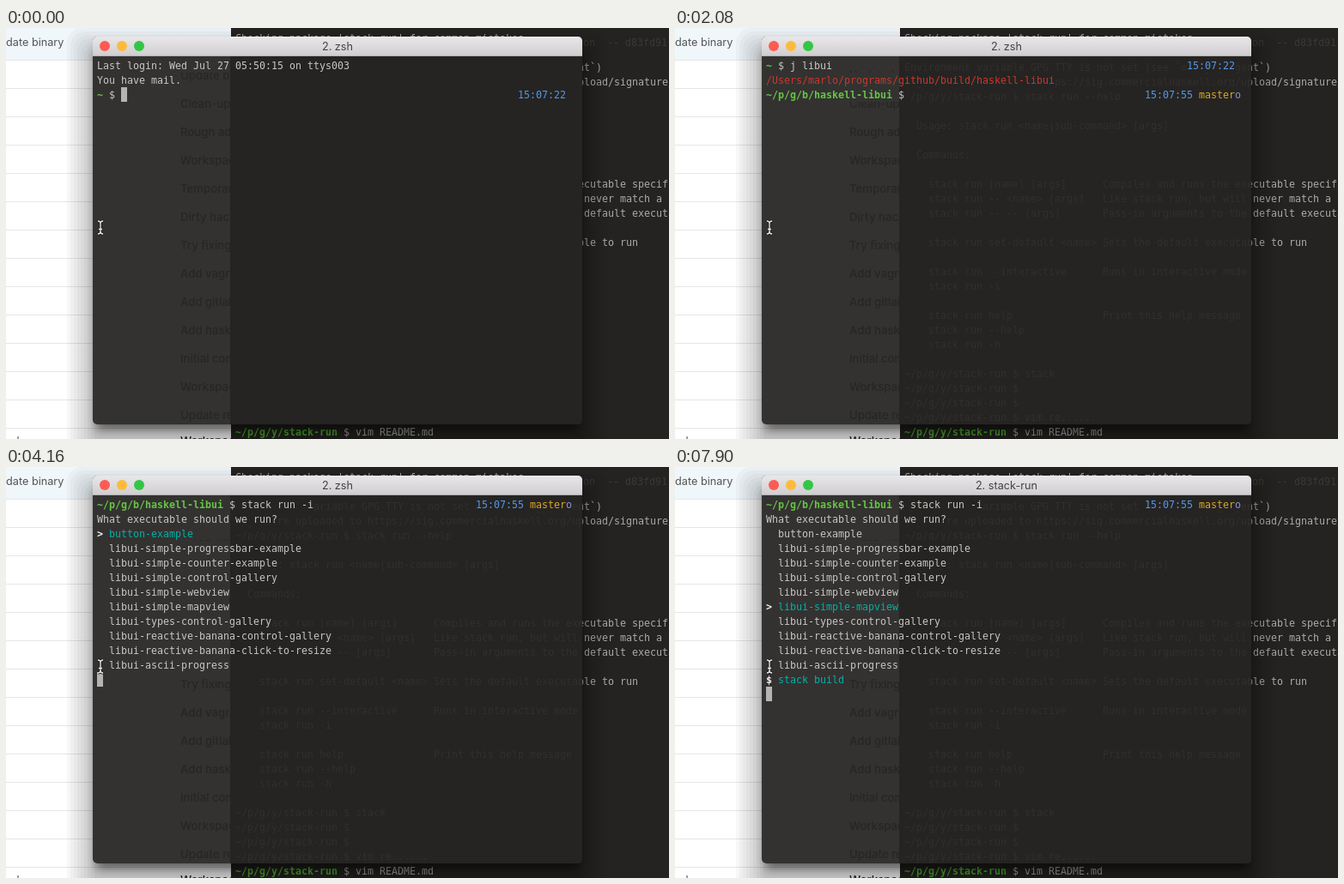
Animation, 772 px wide and 479 px high, one loop 8 s. Source, as an HTML page:

```html
<!DOCTYPE html>
<html lang="en">
<head>
<meta charset="utf-8">
<title>Terminal session</title>
<style>
html, body { margin: 0; width: 100%; height: 100%; overflow: hidden; }
body { position: relative; background: #fff; }
body * { position: absolute; box-sizing: border-box; }
pre, .row { margin: 0; font: 11.63px/17px "DejaVu Sans Mono", monospace; white-space: pre; }
pre span, .row span { position: static; }
.list { left: 0; top: 0; width: 262px; height: 479px; overflow: hidden;
  background: repeating-linear-gradient(#0000 0 32px, #e6e6e6 32px 33px) 0 5px; }
.head { left: 0; top: 0; width: 262px; height: 37px; background: #f0f7fb; }
.ui { font: 12.7px/16px Inter, sans-serif; color: #555; white-space: nowrap; }
.back { left: 262px; top: 0; width: 510px; height: 479px; background: #242322; overflow: hidden; }
.help { color: #adaba8; }
.back .help { left: 5px; top: 4px; }
.hash { left: 410px; top: 9px; color: #3b3937; }
.path { color: #4fb02e; font-weight: bold; }
.window { left: 101px; top: 10px; width: 570px; height: 452px; border-radius: 5px; }
.screen { inset: 0; border-radius: 5px; overflow: hidden; }
.screen, .row > span { background: linear-gradient(90deg, #333231 261px, #252422 0) fixed; }
.screen .help { left: 166px; top: -6px; }
.screen .help, .screen .help .path { color: #322f2d; font-weight: normal; }
.commits { left: 0; top: 0; width: 160px; height: 100%; overflow: hidden; }
.commits .ui { left: 102px; }
.commits .ui, .under { font-size: 13.2px; font-weight: 500; color: #272625; }
.bar { left: 0; top: 0; width: 100%; height: 23px; background: linear-gradient(#e9e7e9, #d0ced0);
  border-bottom: 1px solid #b3b1b3; text-align: center; line-height: 23px; color: #454345; }
.bar b { top: 5px; width: 12px; height: 12px; border-radius: 50%; }
.bar span { left: 0; width: 100%; }
.rows { left: 5px; top: 25px; }
.row { height: 17px; width: 565px; line-height: 19px; color: #c8c6c3; }
.row > span { display: inline-block; height: 17px; }
.row > .right { position: absolute; top: 0; }
.row > .cursor { background: #b6b4b2; }
.green { color: #66c544; font-weight: bold; }
.blue { color: #5596ea; }
.gold { color: #dba527; }
.violet { color: #8f8fd6; }
.teal { color: #00b2a5; }
.red { color: #c9382c; }
.white { color: #f0eeec; font-weight: bold; }
</style>
</head>
<body>
<div class="list"></div>
<div class="head"></div>
<div class="ui" style="left:0;top:9px">date binary</div>
<div class="ui" style="left:-22px;top:474px">branches</div>
<div class="ui under" style="left:203px;top:473px">Workspace</div>
<div class="back"><pre class="help"></pre><pre class="hash">on  -- d83fd91</pre></div>
<div class="window" id="win">
  <div class="screen">
    <div class="commits" id="commits"></div>
    <pre class="help" id="ghost"></pre>
    <div class="rows" id="rows"></div>
    <div class="bar ui">
      <b style="left:8px;background:#fc5b53"></b><b style="left:28px;background:#fdbb3c"></b><b style="left:48px;background:#32c646"></b>
      <span id="title"></span>
    </div>
  </div>
</div>
<svg style="left:104px;top:223px" width="12" height="19" fill="none">
  <defs><path id="beam" d="M3 2Q6 2 6 5V14Q6 17 3 17M9 2Q6 2 6 5M6 14Q6 17 9 17M4 11.5H8"/></defs>
  <use href="#beam" stroke="#1a1a1a" stroke-width="3"/>
  <use href="#beam" stroke="#eee" stroke-width="1.3"/>
</svg>
<script>
const $ = id => document.getElementById(id);
const span = (cls, text) => `<span class="${cls}">${text}</span>`;

// Older terminal behind, also faintly seen through the window
const shell = span('path', '~/p/g/y/stack-run') + ' $ ';
const help = `Checking package 'stack-run' for common mistakes

Environment variable GPG_TTY is not set (see \`man gpg-agent\`)
Signature uploaded to https://sig.commercialhaskell.org/upload/signature/d83fd91
${shell}stack run --help

  Usage: stack run &lt;name|sub-command&gt; [args]

  Commands:

    stack run [name] [args]      Compiles and runs the executable specified
    stack run -- &lt;name&gt; [args]   Like stack run, but will never match a sub-command
    stack run -- -- [args]       Pass-in arguments to the default executable

    stack run set-default &lt;name&gt; Sets the default executable to run

    stack run --interactive      Runs in interactive mode
    stack run -i

    stack run help               Print this help message
    stack run --help
    stack run -h

${shell}stack
${shell}
${shell}
${shell}vim re......
${shell}vim README.md`;
document.querySelectorAll('.help').forEach(el => el.innerHTML = help);

$('commits').innerHTML = ['Update binary', 'Clean-up code', 'Rough addition', 'Workspace setup', 'Temporary fix',
  'Dirty hacks', 'Try fixing build', 'Add vagrant', 'Add gitlab', 'Add haskell', 'Initial commit', 'Workspace setup', 'Update readme']
  .map((text, i) => `<div class="ui" style="top:${37 + 33 * i}px">${text}</div>`).join('');

// Banded soft shadow plus a darker one close under the window
const bands = Array.from({ length: 9 }, (_, i) => `0 20px 0 ${30 - 4 * i}px #00000008`);
$('win').style.boxShadow = ['0 10px 12px -4px #0008', ...bands].join();

const programs = ['button-example', 'libui-simple-progressbar-example', 'libui-simple-counter-example',
  'libui-simple-control-gallery', 'libui-simple-webview', 'libui-simple-mapview', 'libui-types-control-gallery',
  'libui-reactive-banana-control-gallery', 'libui-reactive-banana-click-to-resize', 'libui-ascii-progress'];

const plain = text => span('', text);
const cursor = span('cursor', ' ');
const right = (col, html) => `<span class="right" style="left:${col * 7}px">${html}</span>`;
const home = span('green', '~') + plain(' $ ');
const homeTime = right(70, span('blue', '15:07:22'));
const repo = span('green', '~/p/g/b/haskell-libui') + plain(' $ ');
const repoTime = right(63, span('blue', '15:07:55') + ' ' + span('gold', 'master') + span('violet', 'o'));
const passed = (t, times) => times.filter(x => x <= t).length;

function lines(t) {
  if (t < 140) return [plain('Last login: Wed Jul 27 05:50:15 on ttys003'), plain('You have mail.'), home + cursor + homeTime];
  if (t < 1330) {
    const typed = 'j libui'.slice(0, [0, 2, 3, 5, 7][passed(t, [440, 740, 890, 1040])]);
    const prompt = home + plain(typed);
    return t < 1180 ? [prompt + cursor + homeTime] : [prompt + homeTime, cursor];
  }
  if (t < 2530) return [home + plain('j libui') + homeTime,
    span('red', '/Users/marlo/programs/github/build/haskell-libui'),
    repo + (t < 2080 ? cursor : '') + repoTime];

  const step = t < 2830 ? 0 : Math.min(8, 1 + Math.floor((t - 2830) / 148.5));
  const prompt = repo + plain('stack run -i'.slice(0, Math.ceil(step * 1.5)));
  if (t < 4160) return [prompt + cursor + repoTime];

  const chosen = passed(t, [5060, 5210, 5360, 5810, 7900]);
  const menu = programs.map((name, i) => i === chosen
    ? span('white', '&gt; ') + span('teal', name) : plain('  ' + name));
  const blink = passed(t, [5060, 5660, 6260, 6860, 7310]) % 2 ? '' : cursor;
  const end = t < 7900 ? [blink] : [span('white', '$ ') + span('teal', 'stack build'), cursor];
  return [prompt + repoTime, plain('What executable should we run?'), ...menu, ...end];
}

let shown;
function draw(now) {
  const t = now % 8000;
  const html = lines(t).map((line, i) => `<div class="row" style="top:${17 * i}px">${line}</div>`).join('');
  if (html !== shown) $('rows').innerHTML = shown = html;
  $('title').textContent = t < 4610 ? '2. zsh' : '2. stack-run';
  $('ghost').style.visibility = t < 140 ? 'hidden' : 'visible';
  requestAnimationFrame(draw);
}
draw(performance.now());
</script>
</body>
</html>
```
